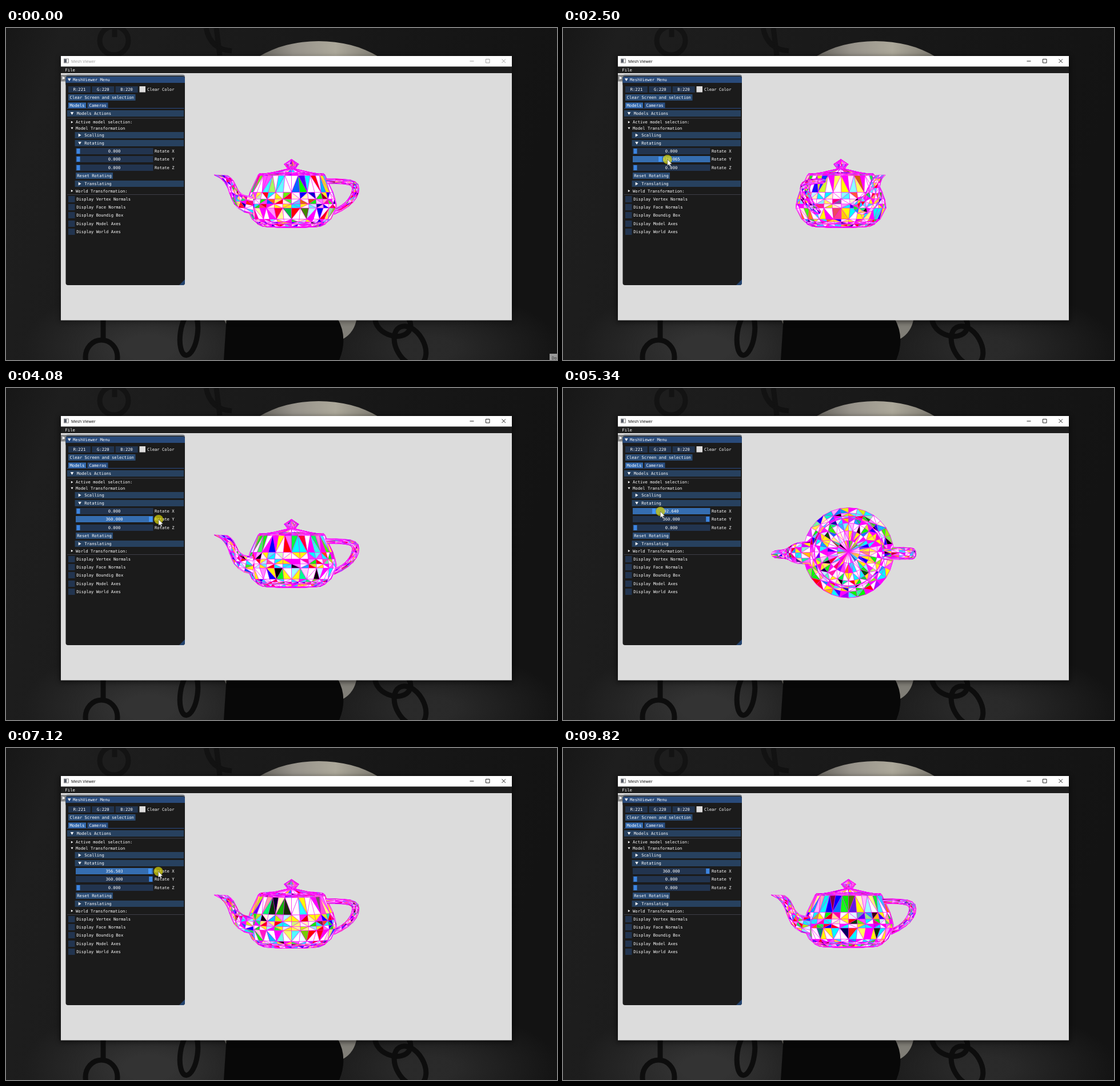
Recreate the animation shown at these times as an HTML page with a canvas. Size 964x581 px, loop 9.92 s.

```html
<!DOCTYPE html>
<html lang="en">
<head>
<meta charset="utf-8">
<title>Mesh Viewer</title>
<style>
  html, body { margin: 0; width: 100%; height: 100%; overflow: hidden; background: #161616; }
  svg, canvas { position: absolute; left: 0; top: 0; width: 964px; height: 581px; }
  text { font: 7.18px "DejaVu Sans Mono", monospace; fill: #fff; white-space: pre; }
  text.title { font: 7.2px "Open Sans", sans-serif; fill: #000; }
  .inactive text.title { fill: #999; }
  .controls { fill: none; stroke: #111; stroke-width: .9; }
  .inactive .controls { stroke: #999; }
  #shadow { filter: blur(4px); opacity: .5; }
  .inactive #shadow { opacity: .3; }
</style>
</head>
<body>
<svg id="scene" viewBox="0 0 964 581" class="inactive">
  <defs>
    <linearGradient id="wall" x2="1" y2=".2">
      <stop offset="0" stop-color="#171717"/><stop offset=".1" stop-color="#1e1e1e"/>
      <stop offset=".6" stop-color="#181818"/><stop offset="1" stop-color="#131313"/>
    </linearGradient>
    <radialGradient id="glow">
      <stop offset=".2" stop-color="#333"/><stop offset="1" stop-color="#333" stop-opacity="0"/>
    </radialGradient>
    <linearGradient id="dome" x2="1">
      <stop offset=".1" stop-color="#5f5d56"/><stop offset=".35" stop-color="#96928a"/>
      <stop offset=".6" stop-color="#aca89a"/><stop offset=".9" stop-color="#77746b"/>
    </linearGradient>
  </defs>
  <rect width="964" height="581" fill="url(#wall)"/>
  <ellipse cx="250" cy="560" rx="220" ry="110" fill="url(#glow)"/>
  <ellipse cx="740" cy="560" rx="230" ry="100" fill="url(#glow)" opacity=".7"/>
  <ellipse cx="547" cy="113" rx="146" ry="90" fill="url(#dome)"/>
  <path d="M570 505H614Q611 532 590 544ZM379 505H392V532Z" fill="#807e77"/>
  <path d="M386 505H578Q600 540 583 581H381Z" fill="#080808"/>
  <g fill="none" stroke="#0d0d0d" stroke-width="9">
    <g opacity=".6"><circle cx="189" cy="22" r="25"/><path d="M190 0V16M368 0L374 48M350 0Q358 38 395 40"/></g>
    <path d="M170 505V545"/><ellipse cx="167" cy="576" rx="28" ry="30"/>
    <ellipse cx="320" cy="535" rx="15" ry="38" transform="rotate(8 320 535)"/>
    <ellipse cx="677" cy="515" rx="32" ry="23" transform="rotate(22 677 515)"/>
    <ellipse cx="707" cy="556" rx="24" ry="37" transform="rotate(-30 707 556)"/>
  </g>
  <rect id="shadow" x="94" y="50" width="793" height="465"/>
  <rect x="96" y="49" width="789" height="462.5" fill="#dcdcdc"/>
  <rect x="96" y="49" width="789" height="18.5" fill="#fff"/>
  <rect x="96" y="67.5" width="789" height="11.5" fill="#1d1d1d"/>
  <rect x="101.5" y="54" width="8" height="7" fill="#eee" stroke="#777" stroke-width=".8"/>
  <rect x="102" y="54.5" width="4" height="6" fill="#555a66"/>
  <text class="title" x="114" y="60.6">Mesh Viewer</text>
  <path class="controls" d="M811.5 58H818.5M839.5 54.5H846V61H839.5ZM867.5 54.5L874 61M874 54.5L867.5 61"/>
  <rect x="96" y="82" width="12" height="11.5" fill="#868686"/>
  <rect x="104" y="81.5" width="209" height="20" rx="4" fill="#747a82"/>
  <rect x="104.5" y="84" width="208.5" height="366" rx="4" fill="#1b1b1b"/>
  <path d="M104.5 96V88Q104.5 85 108 85H309.500Q313 85 313 88V96Z" fill="#294a7a"/>
  <path d="M313 440V446Q313 450 309 450H303Z" fill="#24446f"/>
  <g id="panel"></g>
  <g id="tip"><rect x="951" y="570" width="14" height="12" fill="#9a9a9a"/><text x="955" y="579.5" style="fill:#333">Do</text></g>
</svg>
<canvas id="view" width="964" height="581"></canvas>
<svg viewBox="0 0 964 581">
  <g id="cursor">
    <circle r="8" fill="#dcd70a" opacity=".7"/>
    <path d="M0 0V11L2.600 8.700L4.300 12.500L6 11.800L4.400 8H7.800Z" fill="#fff" stroke="#333" stroke-width=".5"/>
  </g>
</svg>
<script>
const $ = id => document.getElementById(id);

// ---------- panel ----------
const BUTTON = '#2b4c74', FRAME = '#22344f', HEADER = '#27415f', RULE = '#3e3e47';
const box = (x, y, w, h, fill) => `<rect x="${x}" y="${y}" width="${w}" height="${h}" fill="${fill}"/>`;
const label = (x, y, text, extra = '') => `<text x="${x}" y="${y}" ${extra}>${text}</text>`;
const arrow = (x, y, open, s = 2.8) => `<path fill="#fff" d="${open
  ? `M${x - s} ${y - s * .8}h${2 * s}l${-s} ${s * 1.7}z`
  : `M${x - s * .8} ${y - s}v${2 * s}l${s * 1.7} ${-s}z`}"/>`;
const button = (x, y, w, text, fill = BUTTON, h = 11) =>
  box(x, y, w, h, fill) + label(x + w / 2, y + h / 2 + 2.6, text, 'text-anchor="middle"');
const header = (x, y, text, open) =>
  box(x, y, 311 - x, 11, HEADER) + arrow(x + 8.5, y + 5.6, open) + label(x + 16.7, y + 8.4, text);
const node = (y, text, open) => arrow(115.5, y - 2.6, open, 2) + label(122, y, text);
const rule = (y, color) => box(107, y, 204.5, 1, color);
const sliderTop = row => Math.round(210.2 + row * 14.2);

const slider = (axis, row) => {
  const y = sliderTop(row);
  return `<g class="slider">${box(122, y, 135.5, 11, FRAME)}${box(123.5, y + 1, 6, 9, '#3d85e0')}${
    label(189.5, y + 8.4, '', 'text-anchor="middle"')}</g>` + label(260, y + 8.4, 'Rotate ' + axis);
};
const checkbox = (name, i) => {
  const y = Math.round(294 + i * 14.2);
  return box(109, y, 11.5, 11, FRAME) + label(123.2, y + 8.4, 'Display ' + name);
};

$('panel').innerHTML = [
  label(103.5, 76, 'File'), arrow(101, 87.5, false),
  arrow(110.8, 90.5, true), label(117, 93.3, 'MeshViewer Menu'),
  ...['R:221', 'G:220', 'B:220'].map((text, i) => button(109 + i * 41.3, 102, 39, text, FRAME)),
  box(233.5, 102, 10.5, 10.5, '#dddcdc'), label(247, 109.8, 'Clear Color'),
  button(109, 116, 117.5, 'Clear Screen and selection'),
  button(109, 130.5, 31, 'Models', '#3369ad', 10), button(142.5, 130.5, 36, 'Cameras', '#294e82', 10),
  rule(140, '#2b4a80'), header(107, 144, 'Models Actions', true), rule(157.5, RULE),
  node(167.3, 'Active model selection:', false), node(178, 'Model Transformation', true),
  header(120.5, 182, 'Scalling', false), header(120.5, 196, 'Rotating', true),
  ...['X', 'Y', 'Z'].map(slider),
  button(122, 253, 65, 'Reset Rotating'), header(120.5, 267, 'Translating', false),
  node(287.6, 'World Transformation:', false), rule(291, RULE),
  ...['Vertex Normals', 'Face Normals', 'Boundig Box', 'Model Axes', 'World Axes'].map(checkbox)
].join('');
const sliders = [...document.querySelectorAll('.slider')].map(g => g.children);

// ---------- motion ----------
const LOOP = 9920;
const smooth = u => u * u * (3 - 2 * u);
const slowing = u => 1 - (1 - u) ** 1.873;
const handX = angle => 127 + angle / 360 * 140;
const rowY = row => 216 + row * 14;

// Slider drags: pressed from start to release, the value settles at end.
const drags = [
  { row: 1, start: 1700, end: 3726, release: 4100, from: 0, to: 360, ease: smooth },
  { row: 0, start: 5000, end: 7315, release: 7330, from: 0, to: 360, ease: slowing },
  { row: 1, start: 7700, end: 8573, release: 8750, from: 360, to: 0, ease: smooth }
];
const ENTER = { time: 400, x: 958, y: 578 }, EXIT = { time: 9800, x: 885, y: 577 };

const progress = (t, start, end) => Math.min(1, Math.max(0, (t - start) / (end - start)));
const dragAngle = (d, t) => d.from + (d.to - d.from) * d.ease(progress(t, d.start, d.end));

function angleOf(row, t) {
  const drag = drags.filter(d => d.row === row && d.start <= t).pop();
  return drag ? dragAngle(drag, t) : 0;
}

// The hand runs slightly ahead of the slider and glides between drags.
function pointerAt(t) {
  const drag = drags.find(d => t >= d.start && t < d.release);
  if (drag) return { x: handX(dragAngle(drag, t + 75)), y: rowY(drag.row) };
  const stops = [
    ENTER,
    ...drags.flatMap(d => [
      { time: d.start, x: handX(dragAngle(d, d.start + 75)), y: rowY(d.row) },
      { time: d.release, x: handX(d.to), y: rowY(d.row) }
    ]),
    EXIT
  ];
  const i = Math.max(1, stops.findIndex(s => s.time > t)), a = stops[i - 1], b = stops[i];
  const u = smooth(progress(t, a.time, b.time));
  return { x: a.x + (b.x - a.x) * u, y: a.y + (b.y - a.y) * u };
}

// The viewer redraws every 20 ms, apart from a few pauses.
const pauses = [[0, 140], [260, 400], [1320, 1480], [1480, 1680], [9820, LOOP]];
function redrawTime(t) {
  const pause = pauses.find(([start, end]) => t >= start && t < end);
  return pause ? pause[0] : Math.floor(t / 20) * 20;
}

// ---------- teapot: chained cubic curves in model units ----------
const PIVOT = { x: 491, y: 289.5 }, AXIS = 499.5, BASE = 349, SCALE = { x: 39.4, y: 37.8 };
const outline = [
  [0, 3.15], [.8, 3.15], [0, 2.7], [.2, 2.7], [.4, 2.55], [1.3, 2.55], [1.3, 2.4],
  [1.34, 2.53], [1.44, 2.53], [1.5, 2.4], [1.75, 1.875], [2, 1.35], [2, .9],
  [2, .45], [1.5, .225], [1.5, .15], [1.5, .075], [1.425, 0], [0, 0]
];
const handle = {
  outer: [[1.5, 2.25], [2.5, 2.25], [3, 2.25], [3, 1.8], [3, 1.35], [2.65, .94], [1.9, .6]],
  inner: [[1.6, 2.025], [2.3, 2.025], [2.7, 2.025], [2.7, 1.8], [2.7, 1.575], [2.5, 1.125], [2, .9]],
  depth: () => .24
};
const spout = {
  outer: [[-1.7, .6], [-3.1, .825], [-2.4, 2.025], [-3.43, 2.43]],
  inner: [[-1.7, 1.425], [-2.6, 1.425], [-2.3, 2.1], [-2.83, 2.4]],
  depth: u => .5 - .32 * smooth(u)
};

const bezier = (p, k, u) => {
  const v = 1 - u;
  return v * v * v * p[0][k] + 3 * v * v * u * p[1][k] + 3 * v * u * u * p[2][k] + u * u * u * p[3][k];
};
function sample(points, steps, spacing = u => u) {
  const result = [points[0]];
  for (let i = 0; i + 3 < points.length; i += 3)
    for (let s = 1; s <= steps; s++)
      result.push([0, 1].map(k => bezier(points.slice(i, i + 4), k, spacing(s / steps))));
  return result;
}
const place = (x, y, z) => [AXIS - PIVOT.x + x * SCALE.x, BASE - PIVOT.y - y * SCALE.y, z * SCALE.x];
const ring = (n, point) => Array.from({ length: n }, (_, i) => point(i / n * 2 * Math.PI));

function triangulate(rings) {
  const faces = [];
  for (let j = 1; j < rings.length; j++) {
    const a = rings[j - 1], b = rings[j], n = a.length;
    for (let i = 0; i < n; i++) {
      const k = (i + 1) % n;
      faces.push(...((i + j) % 2
        ? [[a[i], a[k], b[i]], [a[k], b[k], b[i]]]
        : [[a[i], a[k], b[k]], [a[i], b[k], b[i]]]));
    }
  }
  return faces;
}

const body = triangulate(sample(outline, 4, Math.sqrt).map(([r, y]) =>
  ring(32, a => place(r * Math.cos(a), y, r * Math.sin(a)))));

function tube({ outer, inner, depth }, steps) {
  const far = sample(outer, steps), near = sample(inner, steps);
  return triangulate(far.map(([x1, y1], i) => {
    const [x2, y2] = near[i], z = depth(i / (far.length - 1));
    return ring(12, a => {
      const u = (1 - Math.cos(a)) / 2;
      return place(x1 + (x2 - x1) * u, y1 + (y2 - y1) * u, z * Math.sin(a));
    });
  }));
}
const parts = [body, tube(handle, 6), tube(spout, 9)];

function randomizer(seed) {
  let s = Math.imul(seed, 2654435761) + 977 | 0;
  return () => {
    s = s + 0x6D2B79F5 | 0;
    let v = Math.imul(s ^ s >>> 15, 1 | s);
    v ^= v + Math.imul(v ^ v >>> 7, 61 | v);
    return ((v ^ v >>> 14) >>> 0) / 4294967296;
  };
}

const ctx = $('view').getContext('2d');
ctx.strokeStyle = '#f0f';
ctx.lineWidth = .55;
ctx.lineJoin = 'bevel';

function drawTeapot(degX, degY, seed) {
  const random = randomizer(seed);
  const channel = () => {
    const v = random();
    return v < .6 ? 255 : v < .78 ? 0 : Math.floor(random() * 255);
  };
  const ax = degX * Math.PI / 180, ay = degY * Math.PI / 180;
  const [cx, sx, cy, sy] = [Math.cos(ax), Math.sin(ax), Math.cos(ay), Math.sin(ay)];
  const rotate = ([x, y, z]) => {
    const x1 = x * cy + z * sy, z1 = z * cy - x * sy;
    return [PIVOT.x + x1, PIVOT.y + y * cx - z1 * sx, y * sx + z1 * cx];
  };
  const depth = face => face[0][2] + face[1][2] + face[2][2];
  ctx.clearRect(0, 0, 964, 581);
  for (const part of parts) {
    const faces = part.map(face => face.map(rotate)).sort((a, b) => depth(a) - depth(b));
    for (const face of faces) {
      ctx.beginPath();
      for (const [x, y] of face) ctx.lineTo(x, y);
      ctx.closePath();
      ctx.fillStyle = `rgb(${channel()},${channel()},${channel()})`;
      ctx.fill();
      ctx.stroke();
    }
  }
}

// ---------- playback ----------
function render(t) {
  const angles = [0, 1, 2].map(row => angleOf(row, t));
  const { x, y } = pointerAt(t);
  const drag = drags.find(d => t >= d.start && t < d.release);
  const shown = t >= ENTER.time && t < EXIT.time;
  sliders.forEach(([frame, grab, value], row) => {
    const active = drag && drag.row === row, top = sliderTop(row);
    const hover = shown && !drag && x > 122 && x < 257.5 && y > top && y < top + 11;
    frame.setAttribute('fill', active ? '#356db0' : hover ? BUTTON : FRAME);
    grab.setAttribute('fill', active ? '#4296fa' : '#3d85e0');
    grab.setAttribute('x', 123.5 + angles[row] / 360 * 126.7);
    value.textContent = angles[row].toFixed(3);
  });
  $('scene').setAttribute('class', t < drags[0].start ? 'inactive' : '');
  $('tip').style.display = t < 260 ? '' : 'none';
  $('cursor').style.display = shown ? '' : 'none';
  $('cursor').setAttribute('transform', `translate(${x} ${y})`);
  drawTeapot(angles[0], angles[1], t / 20 + 1);
}

let last = -1;
function play() {
  const t = redrawTime(performance.now() % LOOP);
  if (t !== last) render(last = t);
  requestAnimationFrame(play);
}
play();
</script>
</body>
</html>
```
